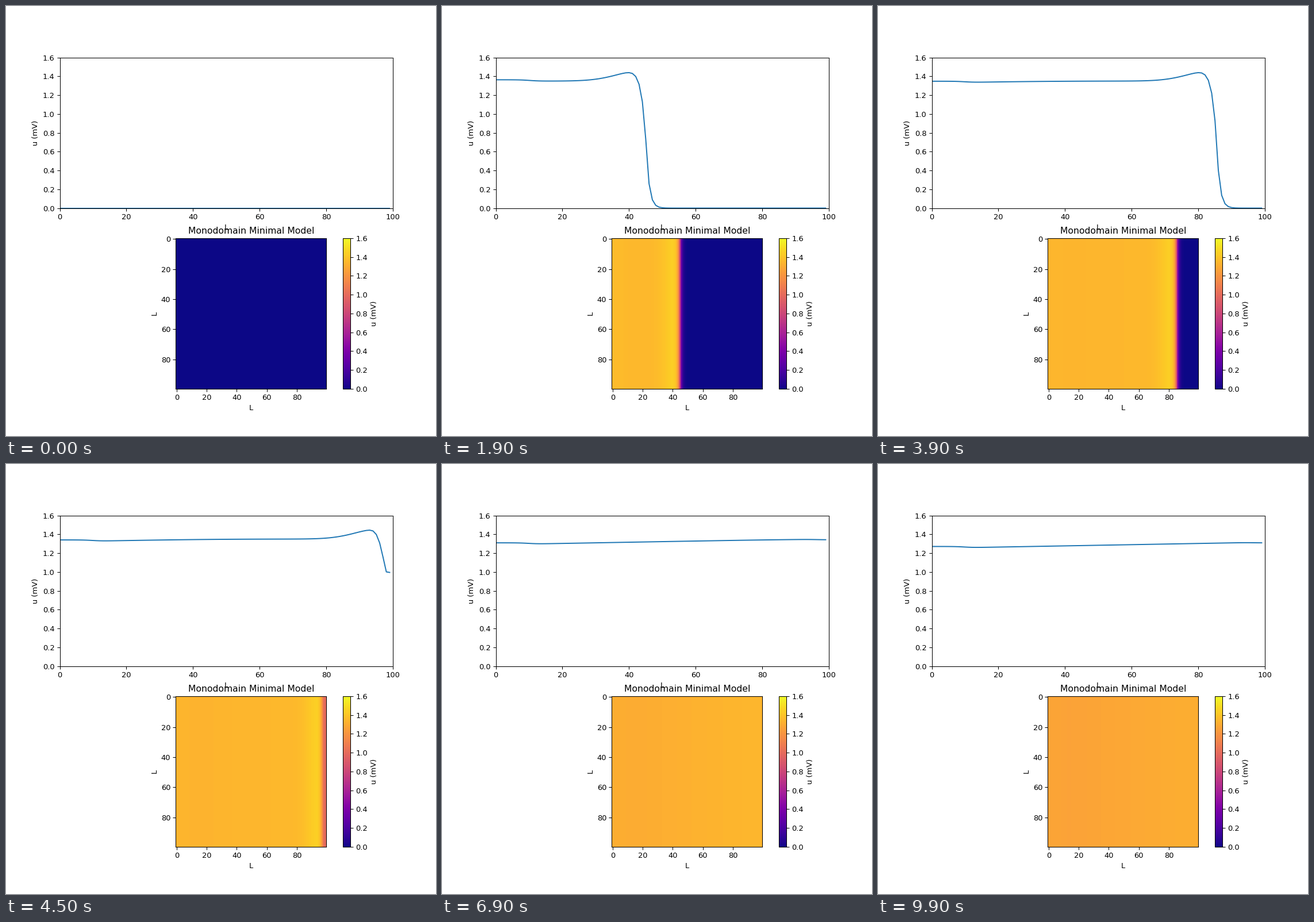
Write a matplotlib script that moves like this. It is 748 px wide and 748 px high and loops after 10000 ms.

```python
import numpy as np
import matplotlib.pyplot as plt
from matplotlib.animation import FuncAnimation

N = 100          # cells along the cable
FRAMES = 100
SPEED = 2.02     # cells per frame
U_MAX = 1.6


def pulse(d):
    """Potential at distance d behind the wave front (negative: ahead)."""
    back = np.maximum(d, 0)
    upstroke = .8435 * np.exp(-.74 * back - .02 * back ** 2)
    hump = .1235 * np.exp(-(back / 11.2) ** 2)
    recovery = .0064 * np.log1p(np.exp((back - 53) / 10))
    behind = 1.351 + hump - upstroke - recovery
    ahead = .63 * np.exp(1.08 * np.minimum(d, 0))
    return np.where(d > 0, behind, ahead)


cells = np.arange(N)
stim = 1 / (1 + np.exp((cells - 10.2) / 1.4))    # stimulated left edge
wall = np.exp(-((cells - 99) / 4) ** 2)          # sealed right end
arrival = np.maximum(10 + (cells - 27) / SPEED, .2)
arrival = arrival * (1 - stim) + .2 * stim - np.exp((cells - 99) / 1.5)


def potential(frame):
    if frame == 0:
        return np.zeros(N)
    age = frame - arrival
    u = pulse(SPEED * age)
    u += stim * (.0145 + .2 * np.exp(-((frame - 1.6) / 1.5) ** 2))
    u += wall * (.072 * np.exp(-((age - 2.1) / 1.3) ** 2)
                 - .004 * np.clip((age - 4) / 3, 0, 1))
    return u


fig, (ax, ax_map) = plt.subplots(2, 1, figsize=(8, 8), dpi=93.5)

line, = ax.plot(cells, np.zeros(N))
ax.set(xlim=(0, 100), ylim=(0, U_MAX), xlabel="L", ylabel="u (mV)")

sheet = ax_map.imshow(np.zeros((N, N)), cmap="plasma", vmin=0, vmax=U_MAX)
ax_map.set(title="Monodomain Minimal Model", xlabel="L", ylabel="L")
fig.colorbar(sheet, ax=ax_map, label="u (mV)")


def update(frame):
    u = potential(frame)
    line.set_ydata(u)
    sheet.set_data(np.tile(u, (N, 1)))
    return line, sheet


anim = FuncAnimation(fig, update, frames=FRAMES, interval=100, repeat=True)
plt.show()
```
